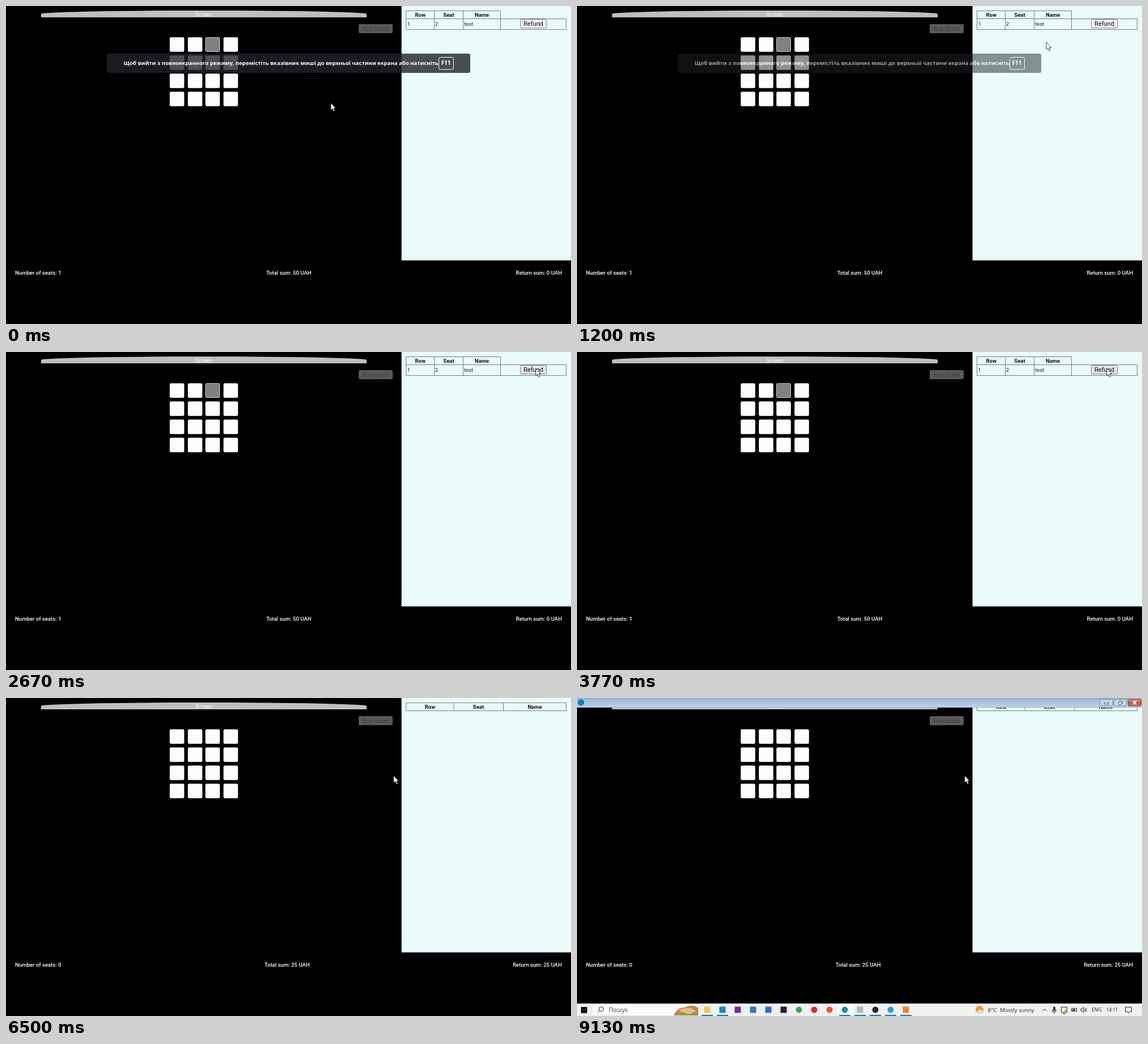
These frames come from a looping animation (998x561 px, 9160 ms). An HTML page:

```html
<!DOCTYPE html>
<html lang="uk">
<head>
<meta charset="utf-8">
<title>Seat booking</title>
<style>
html, body { margin: 0; width: 998px; height: 561px; overflow: hidden; background: #000; }
svg { display: block; font: 400 9.5px Roboto, sans-serif; }
.mid { text-anchor: middle; }
.end { text-anchor: end; }
.foot { font-size: 9.58px; font-weight: 500; fill: #fff; }
.head { font-weight: 700; fill: #111; text-anchor: middle; }
.grid { fill: none; stroke: #777c88; }
.ui { font-family: "Open Sans", "Noto Sans", sans-serif; }
.line { fill: none; stroke: #222; }
</style>
</head>
<body>
<svg width="998" height="561" viewBox="0 0 998 561">
  <defs>
    <linearGradient id="bar" x2="0" y2="1">
      <stop stop-color="#98b4d2"/><stop offset="1" stop-color="#bdd4eb"/>
    </linearGradient>
    <linearGradient id="red" x2="0" y2="1">
      <stop stop-color="#dfa093"/><stop offset=".5" stop-color="#c4503c"/><stop offset="1" stop-color="#d0765c"/>
    </linearGradient>
  </defs>
  <rect width="998" height="561"/>
  <path d="M62 20V14A287.5 6 0 0 1 637 14V20Z" fill="#bfbfbf"/>
  <text class="mid" x="349.3" y="17.7" font-size="9.7" fill="#fff">Screen</text>
  <rect x="623" y="32" width="60" height="16" rx="2" fill="#595959"/>
  <text class="mid" x="653" y="44" font-size="10.7" fill="#3e3e3e">Buy ticket</text>
  <g id="seats"></g>

  <rect x="698.6" width="299.4" height="448.8" fill="#e9fbfa"/>
  <g id="booked">
    <path class="grid" d="M706.5 41.5V8.5H873.5V41.5M756.5 8.5V41.5M807.5 8.5V41.5M706.5 22.5H989.5V41.5H706.5"/>
    <g class="head">
      <text x="731.7" y="19">Row</text><text x="782" y="19">Seat</text><text x="840.6" y="19">Name</text>
    </g>
    <g fill="#222">
      <text x="708.5" y="34.5">1</text><text x="757.7" y="34.5">2</text><text x="809" y="34.5">test</text>
    </g>
    <rect id="refund" x="908.5" y="23.5" width="46" height="15.5" rx="2" stroke="#808080"/>
    <text class="mid" x="931.5" y="35.2" font-size="11.1" fill="#111">Refund</text>
  </g>
  <g id="empty">
    <path class="grid" d="M706.5 8.5H989.5V22.5H706.5ZM791 8.5V22.5M878.5 8.5V22.5"/>
    <g class="head">
      <text x="749" y="19">Row</text><text x="834.5" y="19">Seat</text><text x="934" y="19">Name</text>
    </g>
  </g>

  <g class="foot">
    <text id="count" x="16" y="474"></text>
    <text id="total" class="mid" y="474"></text>
    <text id="back" class="end" x="982" y="474"></text>
  </g>

  <g id="notice" class="ui" fill="#fff" font-weight="700">
    <rect x="178" y="84" width="642" height="34" rx="3" fill="#20242a" fill-opacity=".8"/>
    <text x="207.7" y="104.4" font-size="9.55">Щоб вийти з повноекранного режиму, перемістіть вказівник миші до верхньої частини екрана або натисніть</text>
    <rect x="764.5" y="90.5" width="26" height="21.5" rx="3" fill="none" stroke="#fff"/>
    <text class="mid" x="777" y="104.4" font-size="9.9">F11</text>
  </g>

  <g id="desktop" class="ui">
    <rect width="998" height="17" fill="url(#bar)"/>
    <path d="M0 .5H998M0 16.5H998" stroke="#86a3c2" opacity=".6"/>
    <circle cx="7" cy="8" r="5.7" fill="#1679be"/>
    <g stroke="#7088a5" fill="#c3d7ec">
      <rect x="923.5" y="2.5" width="23" height="11.5" rx="2"/>
      <rect x="948.5" y="2.5" width="22" height="11.5" rx="2"/>
      <rect x="973.5" y="2.5" width="23" height="11.5" rx="2" fill="url(#red)" stroke="#7c3b38"/>
    </g>
    <rect x="931.5" y="8.5" width="7" height="2.5" fill="#fff" stroke="#555e70"/>
    <path d="M958 7V5.5H963.5V9.5H961.5M956.5 7.5H961.5V11.5H956.5Z" fill="#fff" stroke="#555e70"/>
    <path d="M982 5.5L988 11M988 5.5L982 11" stroke="#fff" stroke-width="1.8"/>

    <rect y="539" width="998" height="22" fill="#eff1f3"/>
    <rect x="7" y="545" width="11" height="11" fill="#151515"/>
    <rect x="26.5" y="539.5" width="188" height="21" fill="#fbfbfb" stroke="#dedede"/>
    <path class="line" d="M36 555.5L39.5 552"/>
    <circle class="line" cx="42.7" cy="548.8" r="4"/>
    <text x="56" y="554" font-size="10.4" fill="#444">Пошук</text>
    <path d="M171 560Q176 546 190 546Q206 539 214 547V560Z" fill="#c4854d"/>
    <path d="M174 558Q192 552 214 556V560H172Z" fill="#8da24c"/>
    <path d="M180 552Q195 541 210 552L198 558Z" fill="#e5bd83"/>
    <rect x="460" y="539" width="27" height="22" fill="#fff"/>
    <g id="apps"></g>

    <circle cx="711" cy="550" r="7" fill="#f39a1d"/>
    <path d="M708 557a3.2 3.2 0 0 1 1-6 4 4 0 0 1 7 1 2.6 2.6 0 0 1 1 5Z" fill="#d8dfe8"/>
    <g fill="#222" font-size="9.8">
      <text x="725.5" y="554">8°C</text><text x="747.3" y="554">Mostly sunny</text>
      <text x="909" y="553.3" font-size="8.7">ENG</text><text x="935" y="553.3" font-size="8.1">14:11</text>
    </g>
    <path class="line" d="M822 552.5L826 548.5 830 552.5M839.5 549.5V551a3.3 3.3 0 0 0 6.6 0V549.5M843 554.5V557M855.5 545.5H865.5V554.5H855.5ZM858 557H863M873.5 547.5H882.5V552.5H873.5ZM890 548.5H892L895 545.5V555L892 552H890ZM897 548Q898.5 550 897 552.5M899 546.5Q901.5 550 899 554M968.5 545.5H979.5V553.5H976L974 556 972 553.5H968.5Z"/>
    <rect x="841.3" y="544.5" width="3.5" height="8" rx="1.7" fill="#222"/>
    <rect x="875" y="549" width="5" height="2.5" fill="#222"/>
    <circle cx="864" cy="553" r="2.8" fill="#e58a25"/>
  </g>

  <path id="cursor" d="M.5 0V12.8L3.3 10.1 5.3 15 7.5 14.1 5.5 9.4H9.2Z" fill="#fff" stroke="#111" stroke-width=".8"/>
</svg>
<script>
const $ = id => document.getElementById(id);
const LOOP = 9160, REFUND = 4200, EXIT = 8800;

const rect = (x, y, w, h, fill, extra = "") =>
  `<rect x="${x}" y="${y}" width="${w}" height="${h}" fill="${fill}" ${extra}/>`;

let seats = "";
for (let i = 0; i < 16; i++) {
  const x = Math.round(288.8 + 31.8 * (i % 4)), y = 55 + 32 * (i >> 2);
  seats += rect(x + .5, y + .5, 25, 25, "#fdfdfd", 'rx="2" stroke="#c8c8c2"');
}
$("seats").innerHTML = seats;
const taken = $("seats").children[2];

// Taskbar icons: colour, round or not, running or not
const apps = [
  ["#f4c64f", 0, 1], ["#1e83cc", 0, 1], ["#792a99", 0, 0], ["#3276bd", 0, 0], ["#2a70d0", 0, 0],
  ["#28202b", 0, 0], ["#40a452", 1, 0], ["#e42431", 1, 0], ["#ef5632", 1, 0], ["#198cc1", 1, 1],
  ["#a9bbb3", 0, 1], ["#252329", 1, 1], ["#2a9cda", 1, 1], ["#ee8424", 0, 1]
];
$("apps").innerHTML = apps.map(([color, round, running], i) => {
  const x = 230 + 27 * i;
  return rect(x - 5.5, 544.5, 11, 11, color, round ? 'rx="5.5"' : "") +
    (running ? rect(x - 10, 559, 20, 2, "#1779c2") : "");
}).join("");

const path = [
  [0, 573.3, 171], [600, 573.3, 171], [970, 668, 131], [1200, 828.3, 64], [1670, 933.5, 23],
  [1850, 935.3, 29], [5700, 935.3, 29], [6400, 684.3, 137], [LOOP, 684.3, 137]
];

function cursorAt(t) {
  const i = path.findIndex(p => p[0] > t);
  const [t0, x0, y0] = path[i - 1], [t1, x1, y1] = path[i];
  const k = (t - t0) / (t1 - t0);
  return [x0 + (x1 - x0) * k, y0 + (y1 - y0) * k];
}

const show = (id, on) => $(id).setAttribute("visibility", on ? "visible" : "hidden");

function draw(t) {
  const refunded = t >= REFUND;
  const [x, y] = cursorAt(t);
  $("cursor").setAttribute("transform", `translate(${x} ${y})`);
  const over = x > 908 && x < 955 && y > 23 && y < 39;
  $("refund").setAttribute("fill", over ? "#e3e3e5" : "#efefef");
  taken.setAttribute("fill", refunded ? "#fdfdfd" : "#808080");
  show("booked", !refunded);
  show("empty", refunded);
  show("desktop", t >= EXIT);
  $("notice").setAttribute("opacity", Math.max(0, Math.min(1, (1450 - t) / 400)));
  $("count").textContent = "Number of seats: " + (refunded ? 0 : 1);
  $("total").textContent = `Total sum: ${refunded ? 25 : 50} UAH`;
  $("total").setAttribute("x", refunded ? 496.7 : 499.5);
  $("back").textContent = `Return sum: ${refunded ? 25 : 0} UAH`;
}

const start = performance.now();
function tick() {
  draw((performance.now() - start) % LOOP);
  requestAnimationFrame(tick);
}
tick();
</script>
</body>
</html>
```
